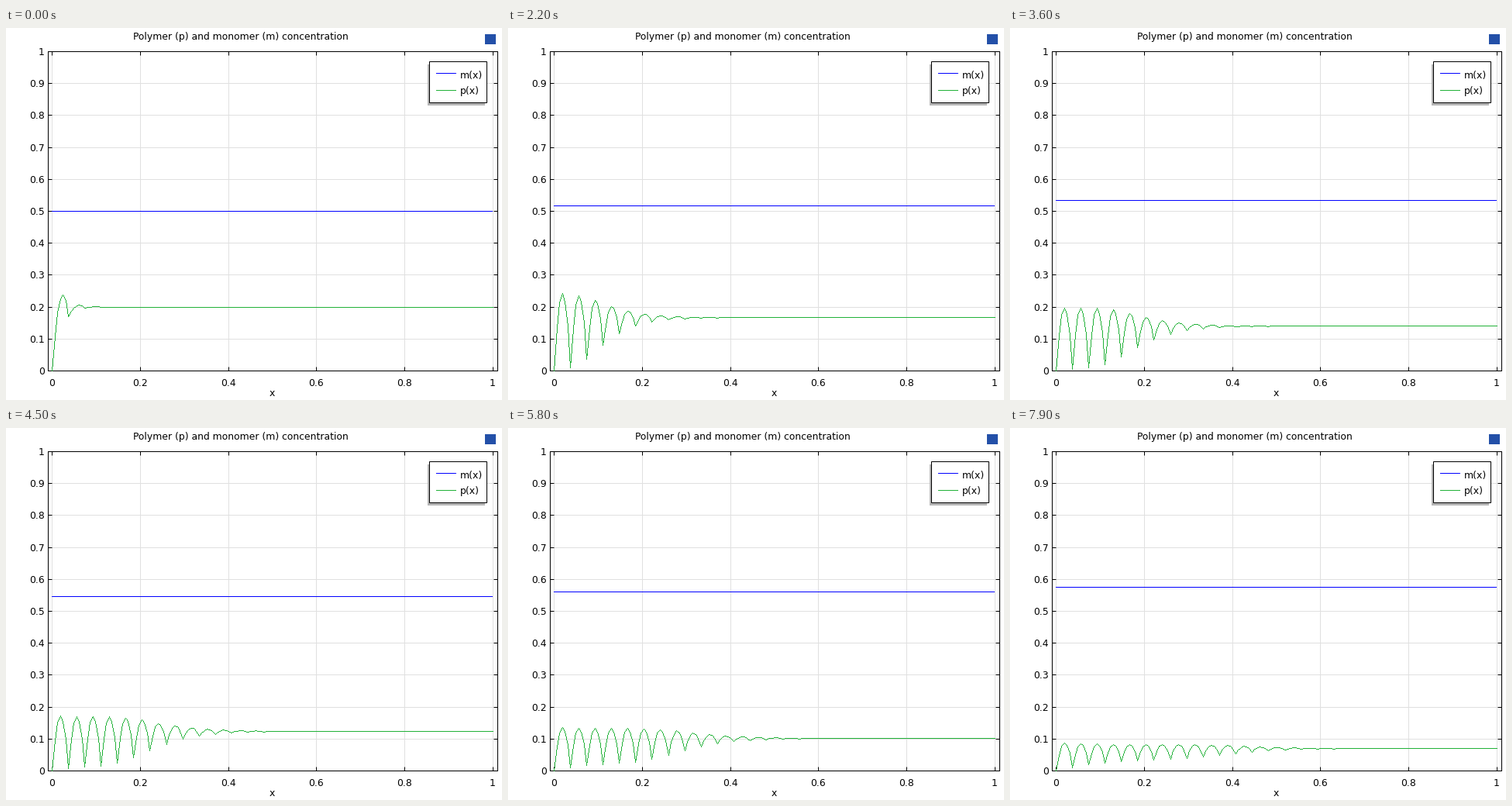
Animation of 640 by 480 pixels, one loop 8000 ms. Source, as a matplotlib script:

```python
import numpy as np
import matplotlib.pyplot as plt
from matplotlib.animation import FuncAnimation
from matplotlib.patches import Rectangle

plt.rcParams["path.simplify"] = False

W, H, DPI = 640, 480, 100
PX = 72 / DPI                       # one pixel in points
X0, XW, Y0, YH = 59.5, 569, 442.5, 412
LEFT, RIGHT, TOP, BOTTOM = 54.5, 634.5, 30.5, 442.5
FRAMES, STEP = 80, 100
CELLS, SUB = 27, 6                  # quadratic mesh cells and segments per cell

BLUE, GREEN, BLACK, GRID = "#0000ff", "#21b138", "black", "#e0e0e0"

# Key times (in steps) with the pixel row of m and the far level of p
KEYS = [0, 9, 22, 36, 45, 58, 79]
M_ROW = [236.5, 234.9, 229.5, 222.6, 217.6, 211.5, 205.2]
P_FAR = [0.2, 0.189, 0.167, 0.14, 0.124, 0.102, 0.07]


def polymer(n):
    """Return x and p at step n: arches on a coarse mesh behind a moving front."""
    far = np.interp(n, KEYS, P_FAR)
    u = n / (FRAMES - 1)
    k = np.arange(CELLS + 1)

    # Relative drop at the cell borders: a widening front, fading behind it
    front = 0.1 + 0.08 * n ** 1.115
    width = 0.5 + 0.19 * np.sqrt(n)
    drop = 1 - np.exp(-np.exp((front - k) / width))
    drop *= np.exp(-1.1 * u ** 3.5 * (1 - np.exp(-k / (0.1 + 6 * u ** 2))))
    drop[0] = 1

    # Bump in mid-cell that makes up for the drops on both sides
    s = np.minimum((k[1:] - .5) / front, 1)
    gain = (1 - .55 * np.exp(-n / 3)) * (1 - .45 * u ** 1.3 * (1 - s ** 2))
    node = far * (1 - drop)
    mid = far * (1 + gain * (drop[:-1] + drop[1:]) / 4)

    t = np.arange(SUB) / SUB
    a, b, c = node[:-1, None], mid[:, None], node[1:, None]
    p = a * (1 - t) * (1 - 2 * t) + 4 * b * t * (1 - t) + c * t * (2 * t - 1)
    return np.linspace(0, 1, CELLS * SUB + 1), np.append(p.ravel(), node[-1])


def center(v):
    return np.floor(v) + .5


def pixels(x, y):
    """Turn a polyline into hard one-pixel dashes."""
    x, y = np.floor(x), np.floor(y)
    cols, rows = [], []
    for xa, ya, xb, yb in zip(x[:-1], y[:-1], x[1:], y[1:]):
        count = int(max(abs(xb - xa), abs(yb - ya), 1))
        t = np.arange(count + 1) / count
        cols.append(np.floor(xa + (xb - xa) * t + .5))
        rows.append(np.floor(ya + (yb - ya) * t + .5))
    i, j = np.concatenate(cols), np.concatenate(rows) + .5
    gap = np.full(i.size, np.nan)
    return np.c_[i, i + 1, gap].ravel(), np.c_[j, j, gap].ravel()


fig = plt.figure(figsize=(W / DPI, H / DPI), dpi=DPI, facecolor="white")
ax = fig.add_axes([0, 0, 1, 1])
ax.set_xlim(0, W)
ax.set_ylim(H, 0)
ax.axis("off")


def line(x, y, color, z=2):
    return ax.plot(x, y, color=color, lw=PX, snap=False,
                   solid_capstyle="butt", zorder=z)[0]


def label(x, y, text, ha="left"):
    ax.text(x, y, text, ha=ha, va="baseline", family="DejaVu Sans",
            size=12.4 * PX, zorder=8)


def box(x, y, w, h, face, edge="none", z=5):
    ax.add_patch(Rectangle((x, y), w, h, fc=face, ec=edge, lw=PX, zorder=z,
                           snap=False, joinstyle="miter"))


for i in range(6):
    x = center(X0 + XW * i / 5)
    line([x, x], [TOP, BOTTOM], GRID, 1)
    line([x, x], [TOP, TOP + 5], BLACK)
    line([x, x], [BOTTOM - 5, BOTTOM], BLACK)
    label(x - .5, 462, f"{i / 5:g}", "center")
for i in range(11):
    y = center(Y0 - YH * i / 10)
    line([LEFT, RIGHT], [y, y], GRID, 1)
    line([LEFT, LEFT + 5], [y, y], BLACK)
    line([RIGHT - 5, RIGHT], [y, y], BLACK)
    label(50, y + 4.5, f"{i / 10:g}", "right")
box(LEFT, TOP, RIGHT - LEFT, BOTTOM - TOP, "none", BLACK, 3)

label(302.5, 15, "Polymer (p) and monomer (m) concentration", "center")
label(343.5, 475, "x", "center")

box(544, 47, 74, 53, "#b4b4b4")
box(546.5, 43.5, 74, 53, "white", BLACK, 6)
line([555, 581], [58.5, 58.5], BLUE, 7)
line([555, 581], [80.5, 80.5], GREEN, 7)
label(586, 65, "m(x)")
label(586, 85, "p(x)")
box(618, 8, 14, 13, "#2350a8")

m_line = line([], [], BLUE, 4)
p_line = line([], [], GREEN, 4)


def draw(n):
    y = center(np.interp(n, KEYS, M_ROW))
    m_line.set_data([59, 628], [y, y])
    x, p = polymer(n)
    p_line.set_data(*pixels(X0 + XW * x, Y0 - YH * p))
    return m_line, p_line


anim = FuncAnimation(fig, draw, frames=FRAMES, interval=STEP, repeat=True,
                     repeat_delay=0, blit=False)
plt.show()
```
